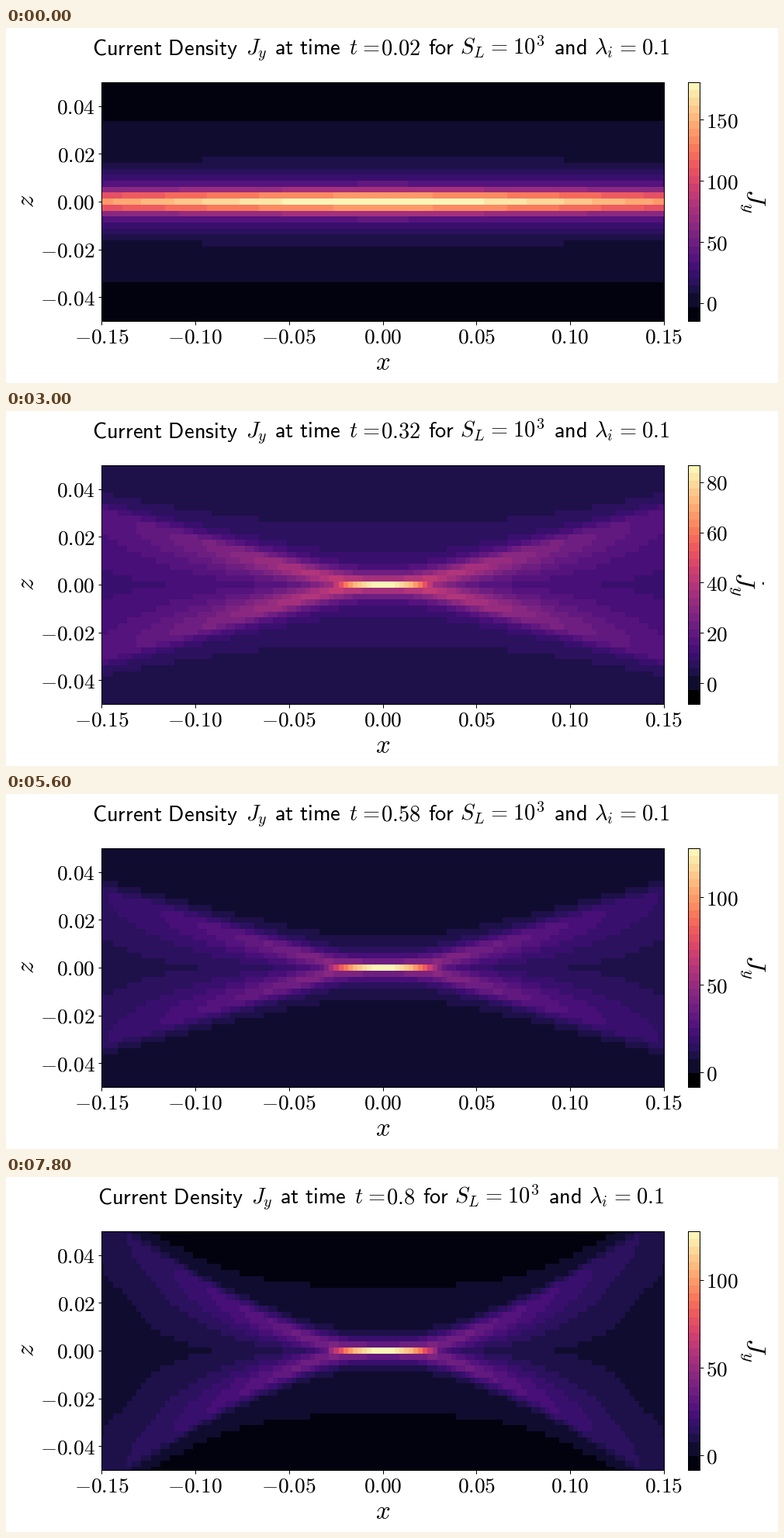
A matplotlib script for the animation above (8000 ms loop, 995 by 458 pixels).

```python
import numpy as np
import matplotlib.pyplot as plt
from matplotlib.animation import FuncAnimation
from matplotlib.ticker import MaxNLocator

W, H, DPI = 995, 458, 64
PX = 72 / DPI  # points per pixel
FRAMES, INTERVAL = 40, 200
plt.rcParams["mathtext.fontset"] = "cm"

# Turning points of the peak current and of the opening of the X
KEYS = np.array([0, 5, 9, 15, 25, 32, 39])
PEAK = np.array([180.7, 159, 133.4, 86.7, 87.9, 176.2, 127.8])
SLOPE = np.array([0, .12, .2, .23, .2, .29, .25])

STEP = .0025
X, Z = np.meshgrid(np.abs(np.arange(-60, 61)) * STEP,
                   np.abs(np.arange(-20, 21)) * STEP)

# Colour bands
EDGES = np.r_[0, .058, np.linspace(.115, 1, 28)]
BANDS = plt.get_cmap("magma")((EDGES[1:] + EDGES[:-1]) / 2)[:, :3]
BAR = np.linspace(0, 1, 309)[:-1, None]


def smooth(n, values):
    """Cubic Hermite curve through the turning points."""
    i = min(np.searchsorted(KEYS, n, "right") - 1, len(KEYS) - 2)
    span = KEYS[i + 1] - KEYS[i]
    m = np.gradient(values, KEYS) * span
    u = (n - KEYS[i]) / span
    return ((1 + 2 * u) * (1 - u) ** 2 * values[i]
            + u * (1 - u) ** 2 * m[i]
            + u * u * (3 - 2 * u) * values[i + 1]
            + u * u * (u - 1) * m[i + 1])


def density(n):
    """Lowest level, peak and current on the grid."""
    peak = smooth(n, PEAK)
    sheet = np.exp(-n / 3.3)  # what is left of the flat initial sheet
    core = .0155 + .00012 * peak + .11 * sheet

    # Wide halo around z = 0
    base = np.interp(n, [0, 5, 25, 39], [-14, 2.6, 2.6, -3.2])
    lift = 6 + 24 * sheet
    halo = base + lift / (1 + (Z / .025) ** 2)

    # Arms of the X, measured in grid rows from their ridge
    d = X - .7 * core
    d = (d + np.sqrt(d * d + 1e-4)) / 2
    bend = 1.5 * np.clip((n - 25) / 14, 0, 1) ** 2
    ridge = (smooth(n, SLOPE) * d + bend * d * d) / STEP
    off = Z / STEP - ridge
    width = 6 + np.where(off < 0, .8 * ridge ** 2, 0)
    crest = 20 + .15 * peak + 118 * sheet
    reach = .1 + .16 * sheet ** 2
    arms = crest / (1 + (X / reach) ** 2) / (1 + off ** 2 / width) ** 2

    # Thin bright core
    spike = max(peak - crest - base - lift, 0) * np.clip(1 - (X / core) ** 2, 0, 1)
    return -8.2 - 6.4 * sheet, peak, halo + arms + spike * (Z < STEP / 2)


def band(v):
    return np.clip(np.digitize(v, EDGES) - 1, 0, len(BANDS) - 1)


def box(x, y, w, h):
    ax = fig.add_axes([x / W, 1 - (y + h) / H, w / W, h / H])
    for s in ax.spines.values():
        s.set_linewidth(PX)
    ax.tick_params(length=4.5 * PX, width=PX, labelsize=27.4 * PX)
    return ax


def raster(ax, shape, extent):
    return ax.imshow(np.zeros((*shape, 3)), origin="lower", aspect="auto",
                     interpolation="nearest", extent=extent)


def put(x, y, s, size, **kw):
    return fig.text(x / W, 1 - y / H, s, fontsize=size * PX, **kw)


def math(s):
    return f"${s}$"


fig = plt.figure(figsize=(W / DPI, H / DPI), dpi=DPI, facecolor="white")

ax = box(123, 70, 725, 308)
half = STEP / 2
field = raster(ax, X.shape, (-.15 - half, .15 + half, -.05 - half, .05 + half))
ax.set(xlim=(-.15, .15), ylim=(-.05, .05))
xt = np.arange(-3, 4) * .05
zt = np.arange(-2, 3) * .02
ax.set_xticks(xt, [math(f"{v:.2f}") for v in xt])
ax.set_yticks(zt, [math(f"{v:.2f}") for v in zt])
ax.tick_params(axis="x", pad=4 * PX)
ax.tick_params(axis="y", pad=3.5 * PX)

cax = box(879, 70, 15, 308)
bar = raster(cax, BAR.shape, (0, 1, 0, 1))
cax.set_xticks([])
cax.yaxis.tick_right()
cax.tick_params(axis="y", pad=3.5 * PX)
ticker = MaxNLocator(5, steps=[1, 2, 2.5, 5, 10])

put(485.5, 441, "$x$", 33, ha="center", va="baseline")
put(27, 223.5, "$z$", 33, ha="center", va="center", rotation=90)
bar_label = put(962, 222.5, "$J_y$", 33, ha="center", va="center", rotation=270)
speck = plt.Rectangle((975 / W, 1 - 224 / H), 2 / W, 3 / H, color="black",
                      lw=0, transform=fig.transFigure)
fig.add_artist(speck)

# Title pieces on either side of the clock value
EQ = r"\hspace{0.08}=\hspace{0.08}"
BEFORE = [(111, r"\mathsf{Current\ Density}"), (309, "J_y"),
          (346, r"\mathsf{at\ time}"), (442, "t" + EQ)]
AFTER = [(544, r"\mathsf{for}"), (585, f"S_L{EQ}10^3"),
         (706, r"\mathsf{and}"), (758, rf"\lambda_i{EQ}0.1")]
CLOCK_X = 483


def title_text(x, s):
    return put(x, 34.5, math(s), 28.4, va="baseline")


left = [title_text(*piece) for piece in BEFORE]
right = [title_text(*piece) for piece in AFTER]
clock = title_text(CLOCK_X, "0")


def draw(n):
    low, top, current = density(n)
    cells = band((current - low) / (top - low))
    colors = BANDS.copy()
    if cells.min() > 0:
        colors[0] = 0
    field.set_data(colors[cells])
    bar.set_data(colors[band(BAR)])

    ticks = [v for v in ticker.tick_values(low, top) if low <= v <= top]
    cax.set_yticks([(v - low) / (top - low) for v in ticks],
                   [math(f"{v:.0f}") for v in ticks])
    cax.set_ylim(0, 1)
    narrow = max(ticks) < 100
    bar_label.set_x((948 if narrow else 962) / W)
    speck.set_visible(narrow)

    # The title stays centred when the clock loses a digit
    time = f"{round(.02 * (n + 1), 2):g}"
    shift = 7 * (4 - len(time))
    clock.set_text(math(rf"\mathsf{{{time}}}"))
    clock.set_x((CLOCK_X + shift) / W)
    for text, (x, _) in zip(left, BEFORE):
        text.set_x((x + shift) / W)
    for text, (x, _) in zip(right, AFTER):
        text.set_x((x - shift) / W)
    return [field, bar, bar_label, speck, clock, *left, *right]


anim = FuncAnimation(fig, draw, frames=FRAMES, interval=INTERVAL,
                     init_func=lambda: draw(0), repeat=True, repeat_delay=0,
                     blit=False)
plt.show()
```
